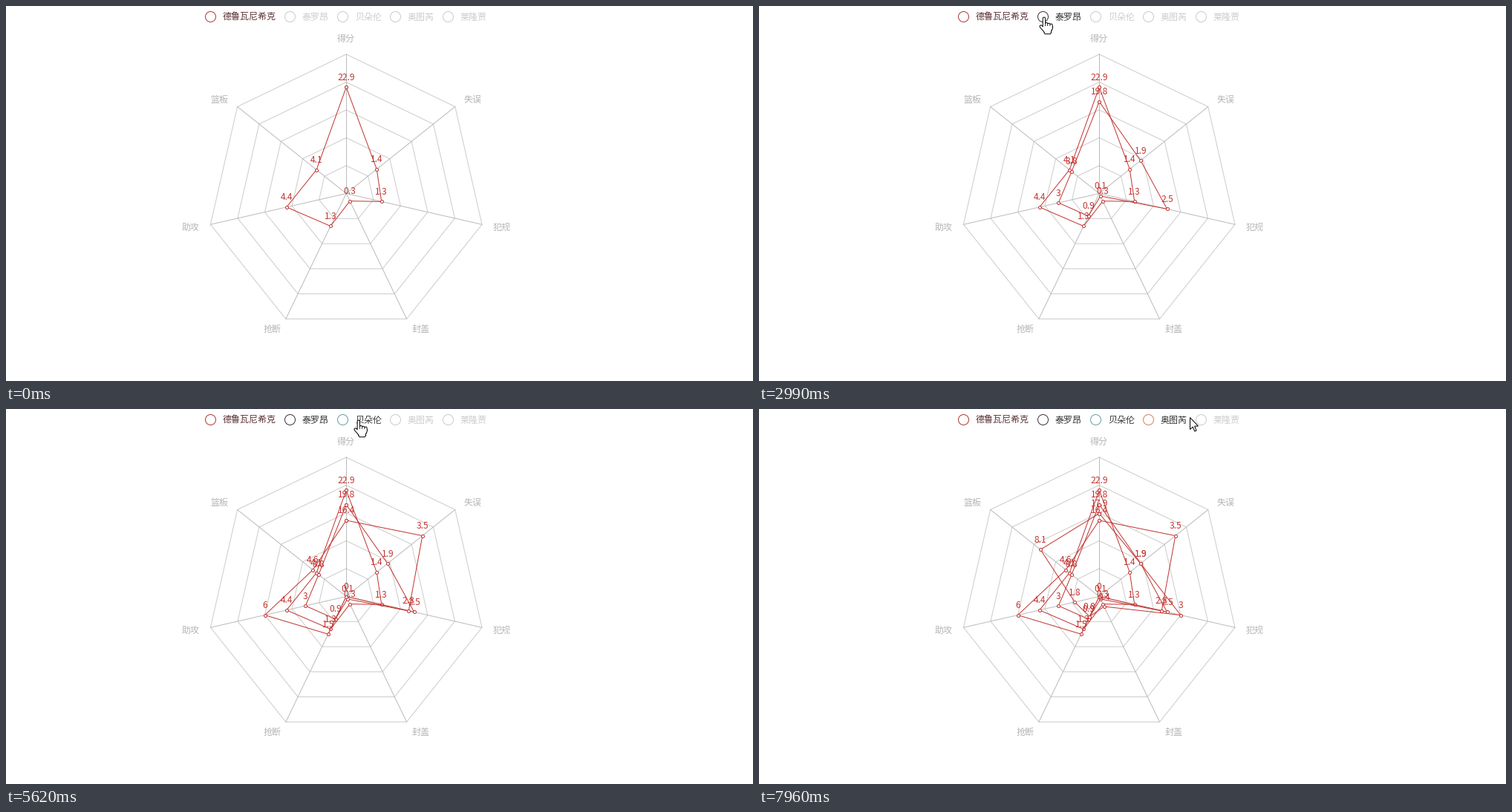
Animation of 1006 by 505 pixels, one loop 8 s. Source, as a matplotlib script:

```python
import numpy as np
import matplotlib.pyplot as plt
from matplotlib.animation import FuncAnimation
from matplotlib.patches import Circle, Polygon

W, H, DPI = 1006, 505, 64
PX = 72 / DPI  # points per pixel
LOOP, TICK = 8000, 20
ENTER, GRAB = 340, 77.7  # pointer's arrival and time between screen grabs, ms

plt.rcParams["font.family"] = "Noto Sans CJK JP"
plt.rcParams["font.size"] = 12 * PX

CX, CY, R = 457.7, 252, 187.5
RED, OFF, HOVER = "#c23531", "#cccccc", "#e2e2e2"
AXES = {"得分": 30, "篮板": 15, "助攻": 10, "抢断": 5, "封盖": 5, "犯规": 5, "失误": 5}

# name, icon colour, text colour, time switched on, values
PLAYERS = [
    ("德鲁瓦尼希克", "#b03a38", "#5c3236", -1000, (22.9, 4.1, 4.4, 1.3, 0.3, 1.3, 1.4)),
    ("泰罗昂", "#403540", "#333333", 2060, (19.8, 3.8, 3, 0.9, 0.1, 2.5, 1.9)),
    ("贝朵伦", "#6a9fa6", "#333333", 4140, (16.4, 4.6, 6, 1.5, 0, 2.3, 3.5)),
    ("奥图芮", "#d48265", "#333333", 6435, (17.9, 8.1, 1.8, 0.8, 0.4, 3, 1.9)),
    ("莱隆贾", "#91c7ae", "#333333", np.inf, ()),
]

# Pointer glides: start, end, destination
ORIGIN = (885, 451)
GLIDES = [(ENTER, 890, (455, 14)), (900, 1300, (383, 14)), (3140, 3850, (456, 14)),
          (5555, 6240, (522, 14)), (7740, 7950, (580, 11))]

ARROW = np.array([(0, 0), (0, 16), (3.7, 12.6), (6.2, 18.5), (8.6, 17.5),
                  (6.1, 11.7), (11, 11.5)])

fig = plt.figure(figsize=(W / DPI, H / DPI), dpi=DPI, facecolor="white")
ax = fig.add_axes([0, 0, 1, 1])
ax.set_xlim(-0.5, W - 0.5)
ax.set_ylim(H - 0.5, -0.5)
ax.axis("off")

angle = np.pi / 2 + np.arange(7) * 2 * np.pi / 7
SPOKES = np.column_stack([np.cos(angle), -np.sin(angle)])


def ease(t, start, end):
    """Cubic ease-out from 0 to 1."""
    return 1 - (1 - np.clip((t - start) / (end - start), 0, 1)) ** 3


def at(radius):
    """Points on the spokes at the given radius or radii."""
    return np.array([CX, CY]) + SPOKES * np.reshape(radius, (-1, 1))


def closed(pts):
    return np.vstack([pts, pts[:1]]).T


def label(x, y, s, color, ha="center", z=2):
    """Text centred vertically on y."""
    return ax.text(x, y + 4.5, s, color=color, ha=ha, va="baseline", zorder=z)


def draw_grid():
    for k in range(1, 6):
        ax.plot(*closed(at(R * k / 5)), color="#cccccc", lw=PX, zorder=1)
    for x, y in at(R):
        ax.plot([CX, x], [CY, y], color="#bbbbbb", lw=PX, zorder=1.1)
    for name, (x, y), (dx, _) in zip(AXES, at(R + 15), SPOKES):
        if abs(dx) < 0.01:
            label(x, y - 6.5, name, "#b5b5b5")
        else:
            label(x, y - 0.5, name, "#b5b5b5", "left" if dx > 0 else "right")


def hand_strokes():
    """Fingers, thumb and palm of the hand pointer as thick strokes."""
    strokes = [[(0.4, 2.3), (0.4, 16)], [(-3.8, 13), (1.5, 19)]]
    strokes += [[(0.4 + 3.2 * i, 8.8 + 0.8 * i), (0.4 + 3.2 * i, 16)] for i in (1, 2, 3)]
    for y in np.linspace(14, 21.5, 5):
        inset = (y - 14) / 4
        strokes.append([(0.4 + inset, y), (10 - inset, y)])
    return np.vstack([s + [(np.nan, np.nan)] for s in strokes])


class Player:
    def __init__(self, x, name, color, ink, start, values):
        self.color, self.ink, self.start = color, ink, start
        self.left, self.right = x - 12.5, x + 17 + 12 * len(name)
        self.icon = ax.add_patch(Circle((x, 14), 7, fc="white", ec=OFF, lw=PX, zorder=2))
        self.text = label(x + 16.5, 14, name, OFF, "left")
        self.reach = R * np.array(values) / list(AXES.values()) if values else None
        z = 3 + x / W
        self.line, = ax.plot([], [], color=RED, lw=PX, marker="o", ms=4 * PX,
                             mfc="white", mec=RED, mew=PX, zorder=z)
        self.tags = [label(0, 0, f"{v:g}", RED, z=z + 0.01) for v in values]

    def under(self, x, y):
        return self.left <= x <= self.right and 7 <= y <= 21

    def update(self, t, hovered):
        on = t >= self.start
        self.icon.set_edgecolor(self.color if on else HOVER if hovered else OFF)
        self.text.set_color(self.ink if on else OFF)
        for part in [self.line, *self.tags]:
            part.set_visible(on)
        if on:
            pts = at(self.reach * ease(t, self.start, self.start + 1000))
            self.line.set_data(*closed(pts))
            for tag, (x, y) in zip(self.tags, pts):
                tag.set_position((x, y - 9.5))


class Pointer:
    def __init__(self):
        self.click = ax.add_patch(Circle((0, 0), 12, fc="#ffff00", alpha=0.47, lw=0, zorder=10))
        self.arrow = ax.add_patch(Polygon(ARROW, fc="white", ec="black", lw=PX, zorder=11))
        self.shape = hand_strokes()
        self.hand = [ax.plot([], [], color=c, lw=w * PX, solid_capstyle="round", zorder=12)[0]
                     for c, w in (("black", 4.4), ("white", 2.4))]

    def position(self, t):
        pos = np.array(ORIGIN, float)
        for start, end, goal in GLIDES:
            pos += (goal - pos) * ease(t, start, end)
        return pos

    def update(self, pos, shown, hand, clicking):
        self.click.set_visible(clicking)
        self.click.center = tuple(pos)
        self.arrow.set_visible(shown and not hand)
        self.arrow.set_xy(ARROW + pos)
        for line in self.hand:
            line.set_visible(hand)
            line.set_data(*(self.shape + pos).T)


def build_legend(x=275):
    players = []
    for spec in PLAYERS:
        players.append(Player(x, *spec))
        x += 35 + 12 * len(spec[0])
    return players


draw_grid()
players = build_legend()
pointer = Pointer()


def update(k):
    now = k * TICK + TICK / 2
    t = ENTER + GRAB * np.floor((now - ENTER) / GRAB)
    pos = pointer.position(t)
    shown = ENTER <= t < 960 or t >= 1190
    over = [shown and p.under(*pos) for p in players]
    for p, hovered in zip(players, over):
        p.update(t, hovered)
    pointer.update(pos, shown, any(over), any(abs(t - p.start) < 90 for p in players))
    return []


anim = FuncAnimation(fig, update, frames=LOOP // TICK, interval=TICK,
                     repeat=True, repeat_delay=0, blit=False)
plt.show()
```
